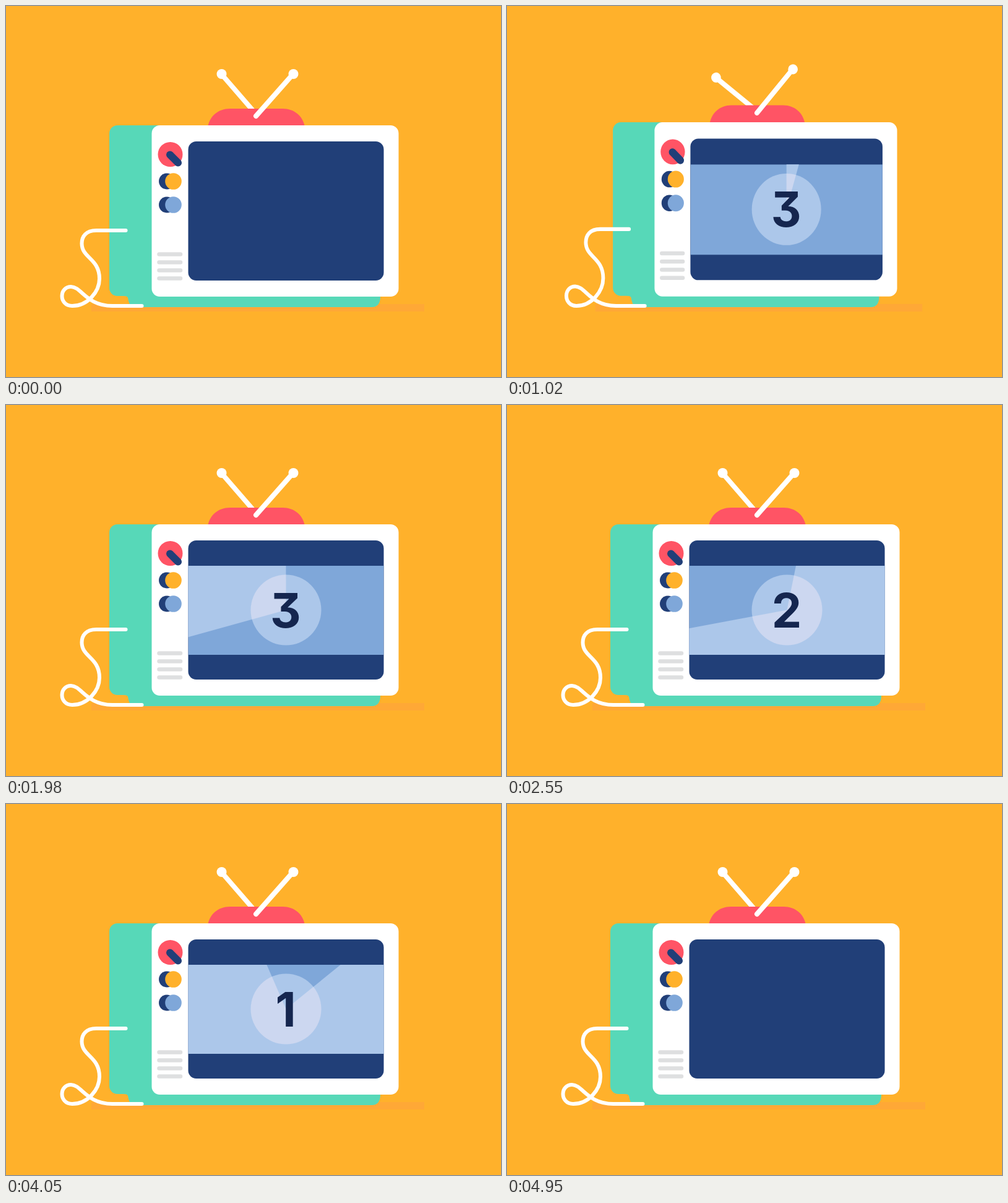
Recreate the animation shown at these times as an HTML page. Size 800x600 px, loop 5.01 s.

```html
<!DOCTYPE html>
<html lang="en">
<head>
<meta charset="utf-8">
<title>Television countdown</title>
<style>
  html, body { margin: 0; width: 100%; height: 100%; overflow: hidden; background: #ffb12b; }
  svg { display: block; width: 100vw; height: 100vh; }
  .line { fill: none; stroke-linecap: round; stroke-linejoin: round; }
  #digit { font: 700 77px Inter, "Open Sans", sans-serif; font-feature-settings: "cv09"; fill: #15264f; text-anchor: middle; }
</style>
</head>
<body>
<svg viewBox="0 0 800 600">
  <defs>
    <clipPath id="disc"><circle cx="452.5" cy="331.5" r="57"/></clipPath>
    <clipPath id="band"><rect x="294.5" y="260" width="316" height="144"/></clipPath>
  </defs>
  <g id="tv">
    <rect x="138" y="482" width="538" height="12" fill="#ffa836"/>
    <g fill="#57d8b8">
      <rect x="167" y="193" width="140" height="276" rx="13"/>
      <path d="M190 469C198 469 197 472 198 477Q200 487 210 487H591Q605 487 605 470V460H190Z"/>
    </g>
    <g id="left" stroke="#fff" fill="#fff">
      <path class="line" d="M348 110L406 177" stroke-width="8"/>
      <circle cx="348.500" cy="110" r="8" stroke="none"/>
    </g>
    <path d="M326 196C329 178 343 166 362 166H447C466 166 480 178 483 196Z" fill="#ff5465"/>
    <g id="right" stroke="#fff" fill="#fff">
      <path class="line" d="M464 110L404 178" stroke-width="8"/>
      <circle cx="464.500" cy="110" r="8" stroke="none"/>
    </g>
    <rect x="235.500" y="193" width="399" height="277" rx="13" fill="#fff"/>
    <circle cx="265.500" cy="240" r="20" fill="#ff5465"/>
    <path class="line" d="M265 240.500L278 253.500" stroke="#213f78" stroke-width="12"/>
    <g fill="#213f78">
      <circle cx="260" cy="283.500" r="13"/>
      <circle cx="260" cy="321.500" r="13"/>
      <rect x="294.500" y="219" width="316" height="225" rx="13"/>
    </g>
    <circle cx="270.500" cy="283.500" r="13.300" fill="#ffb12b"/>
    <circle cx="270.500" cy="321.500" r="13.300" fill="#7fa7d9"/>
    <path class="line" d="M247.500 401.500h34.500m-34.500 13h34.500m-34.500 13h34.500m-34.500 13h34.500" stroke="#dedfe0" stroke-width="6.500"/>
    <g id="show">
      <g clip-path="url(#band)">
        <rect x="294.500" y="260" width="316" height="144" fill="#7fa7d9"/>
        <circle cx="452.500" cy="331.500" r="57" fill="#acc7ea"/>
        <path class="wedge" fill="#acc7ea"/>
        <g clip-path="url(#disc)"><path class="wedge" fill="#ccd7f0"/></g>
      </g>
      <text id="digit" x="452" y="359.500">3</text>
    </g>
    <path class="line" stroke="#fff" stroke-width="6" d="M193.500 363H146C129 363 122.500 373 122.500 384C122.500 408 151 408 151 441C151 462 132 485 107 485C96 485 90.500 477 90.500 469C90.500 460 97 454 105 454C122 454 130 485 172 485H219.500"/>
  </g>
</svg>
<script>
const LOOP = 5010, FIRST_SWEEP = 1010, FIRST_SWAP = 950, PERIOD = 1270, SWEEP = 1120;
const CX = 452.5, CY = 331.5;
const $ = id => document.getElementById(id);
const wedges = document.querySelectorAll('.wedge');
const clamp = x => Math.min(1, Math.max(0, x));
const sine = u => (1 - Math.cos(Math.PI * u)) / 2;

// Each key is [time, value], eased with a half cosine
function track(keys, t) {
  const i = keys.findIndex(k => k[0] > t);
  if (i < 0) return keys[keys.length - 1][1];
  if (i === 0) return keys[0][1];
  const [t0, a] = keys[i - 1], [t1, b] = keys[i];
  return a + (b - a) * sine((t - t0) / (t1 - t0));
}

const stretch = [[510, 0], [660, .105], [840, -.05], [1010, .017], [1150, 0]];
const leftSwing = [[510, 0], [640, 12], [980, -13], [1180, 9], [1340, -3], [1470, 0]];
const rightSwing = [[510, 0], [640, 13], [870, -15], [1120, 6], [1310, -3], [1450, 0]];
const opening = [[600, 0], [790, 1], [4740, 1], [4930, 0]];

// Pie slice between two turns, measured clockwise from the top
function slice(from, to) {
  const point = turn => {
    const a = turn * 2 * Math.PI;
    return `${CX + 300 * Math.sin(a)} ${CY - 300 * Math.cos(a)}`;
  };
  if (to - from < .0005) return '';
  const mid = (from + to) / 2;
  return `M${CX} ${CY}L${point(from)}A300 300 0 0 1 ${point(mid)}A300 300 0 0 1 ${point(to)}Z`;
}

function draw(t) {
  const s = track(stretch, t);
  $('tv').setAttribute('transform',
    `translate(404 488) scale(${1 - 1.04 * s} ${1 + s}) translate(-404 -488)`);
  $('left').setAttribute('transform', `rotate(${track(leftSwing, t)} 405 178)`);
  $('right').setAttribute('transform', `rotate(${track(rightSwing, t)} 404 178)`);

  const open = track(opening, t);
  $('show').setAttribute('visibility', open > .001 ? 'visible' : 'hidden');
  $('show').setAttribute('transform', `translate(0 ${CY}) scale(1 ${open}) translate(0 ${-CY})`);

  const step = Math.min(2, Math.max(0, Math.floor((t - FIRST_SWAP) / PERIOD)));
  const u = clamp((t - FIRST_SWEEP - step * PERIOD) / SWEEP);
  const d = slice(u ** 2.43, 1 - (1 - u) ** 4.6);
  wedges.forEach(w => w.setAttribute('d', d));
  $('digit').textContent = 3 - step;
}

const start = performance.now();
function frame() {
  draw((performance.now() - start) % LOOP);
  requestAnimationFrame(frame);
}
frame();
</script>
</body>
</html>
```
